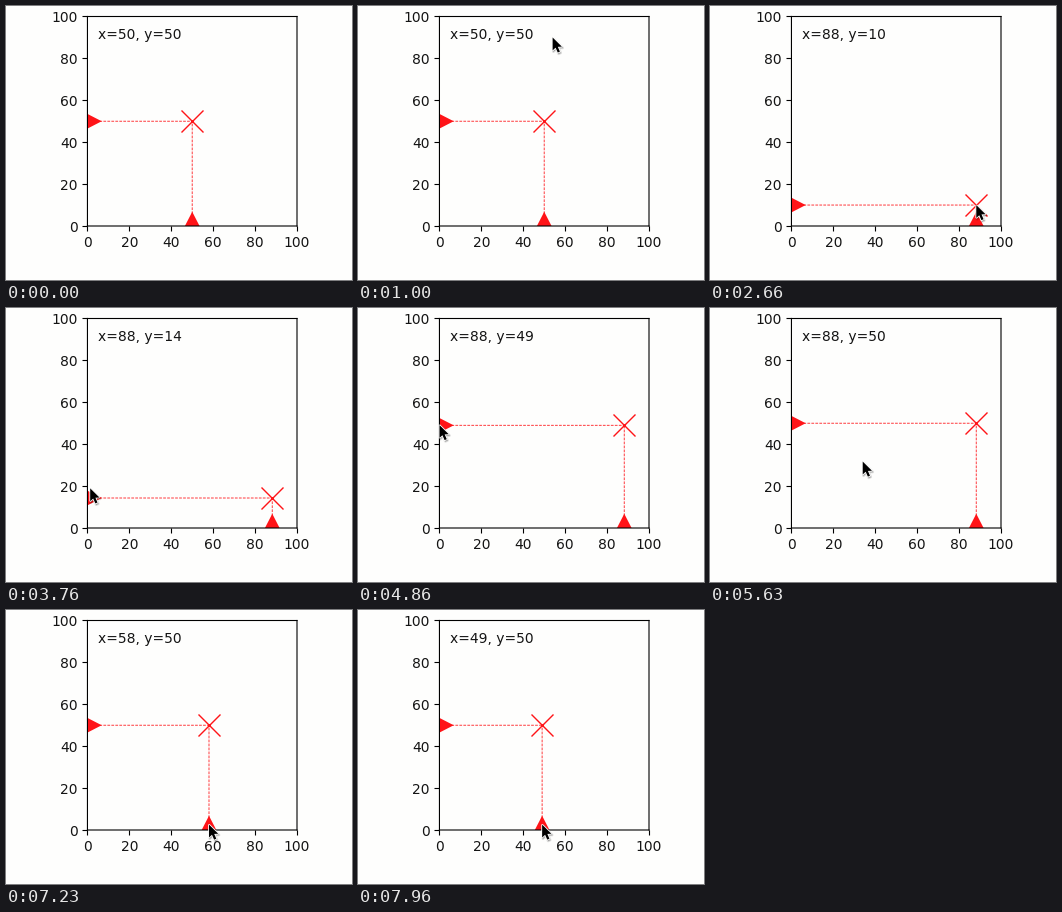
Animation of 346 by 274 pixels, one loop 8 s. Source, as a matplotlib script:

```python
import numpy as np
import matplotlib.pyplot as plt
from matplotlib.animation import FuncAnimation
from matplotlib.patches import Polygon

W, H, DPI = 346, 274, 100
LEFT, RIGHT, TOP, BOTTOM = 81.45, 291, 10.5, 220
RED, INK, PAPER = "#ff1418", "#141414", "#fefefd"

FRAMES, INTERVAL = 400, 20
TICK = 30   # pointer samples per second
LAG = 1.5   # ticks between the pointer and the marker it drags

# Pointer moves: first tick, last tick, goal in data units
START = (130, 38)
MOVES = [
    (3, 30, 54, 90),
    (30, 35, 50.5, 85.4),
    (38, 54, 50, 50),
    (61, 70, 88.2, 10),
    (90, 100, 1.7, 10),
    (108.5, 123, 0, 49),
    (145, 149, 0, 50),
    (157, 183, 88.2, 2.6),
    (191.5, 206, 58, 2.6),
    (216, 222, 50, 2.6),
    (226, 228, 48, 2.6),
    (236, 237, 49, 2.6),
]

# Tick spans in which the pointer drags each coordinate
X_DRAGS = [(61, 70), (191.5, 240)]
Y_DRAGS = [(61, 70), (108.5, 149)]

ARROW = 0.83 * np.array([(0, 0), (0, 15.6), (3.6, 12.3), (6.2, 18.2),
                         (8.8, 17.1), (6.3, 11.3), (11.2, 11.1)])


def pointer(k):
    pos = np.array(START, float)
    for first, last, x, y in MOVES:
        s = np.clip((k - first) / (last - first), 0, 1)
        pos += (np.array((x, y)) - pos) * s * s * (3 - 2 * s)
    return pos


def dragged(k, drags, axis):
    value = 50.0
    for first, last in drags:
        if k - LAG > first:
            value = pointer(min(k - LAG, last))[axis]
    return value


fig = plt.figure(figsize=(W / DPI, H / DPI), dpi=DPI, facecolor=PAPER)
ax = fig.add_axes([LEFT / W, 1 - BOTTOM / H,
                   (RIGHT - LEFT) / W, (BOTTOM - TOP) / H],
                  facecolor=PAPER)
ax.set(xlim=(0, 100), ylim=(0, 100),
       xticks=range(0, 101, 20), yticks=range(0, 101, 20))
ax.tick_params(labelcolor=INK)
for part in (*ax.spines.values(), *ax.get_xticklines(), *ax.get_yticklines()):
    part.set_snap(False)

top = fig.add_axes([0, 0, 1, 1])
top.set(xlim=(0, W), ylim=(H, 0))
top.axis("off")

guide = dict(color=RED, lw=0.7, dashes=(2.8, 1.3), alpha=0.85, snap=False)
h_line, = ax.plot([], [], **guide)
v_line, = ax.plot([], [], **guide)
cross, = ax.plot([], [], "x", color=RED, ms=15.5, mew=1, snap=False)
label = ax.text(5, 89.4, "", color=INK)

x_mark, y_mark = (ax.add_patch(Polygon([(0, 0)] * 3, fc=RED, ec="none",
                                       zorder=2.2)) for _ in range(2))

shadows = [top.add_patch(Polygon(ARROW, fc="black", ec="black", lw=w,
                                 alpha=0.09, joinstyle="round"))
           for w in (0.4, 1.2, 2)]
rim = top.add_patch(Polygon(ARROW, fc="white", ec="white", lw=1.2))
body = top.add_patch(Polygon(ARROW, fc="black", ec="none"))


def draw(n):
    k = int((n * INTERVAL + 10) * TICK / 1000)
    x, y = dragged(k, X_DRAGS, 0), dragged(k, Y_DRAGS, 1)
    h_line.set_data([0, x], [y, y])
    v_line.set_data([x, x], [0, y])
    cross.set_data([x], [y])
    x_mark.set_xy([(x - 3.5, 0), (x + 3.5, 0), (x, 6.8)])
    y_mark.set_xy([(0, y - 3.5), (0, y + 3.5), (6.8, y)])
    label.set_text(f"x={x:.0f}, y={y:.0f}")

    px, py = pointer(k) / 100
    shape = ARROW + (LEFT + (RIGHT - LEFT) * px, BOTTOM - (BOTTOM - TOP) * py)
    for s in shadows:
        s.set_xy(shape + (0.8, 1.3))
    rim.set_xy(shape)
    body.set_xy(shape)
    return h_line, v_line, cross, x_mark, y_mark, label, rim, body, *shadows


anim = FuncAnimation(fig, draw, frames=FRAMES, interval=INTERVAL,
                     init_func=lambda: draw(0), repeat=True, repeat_delay=0)
plt.show()
```
